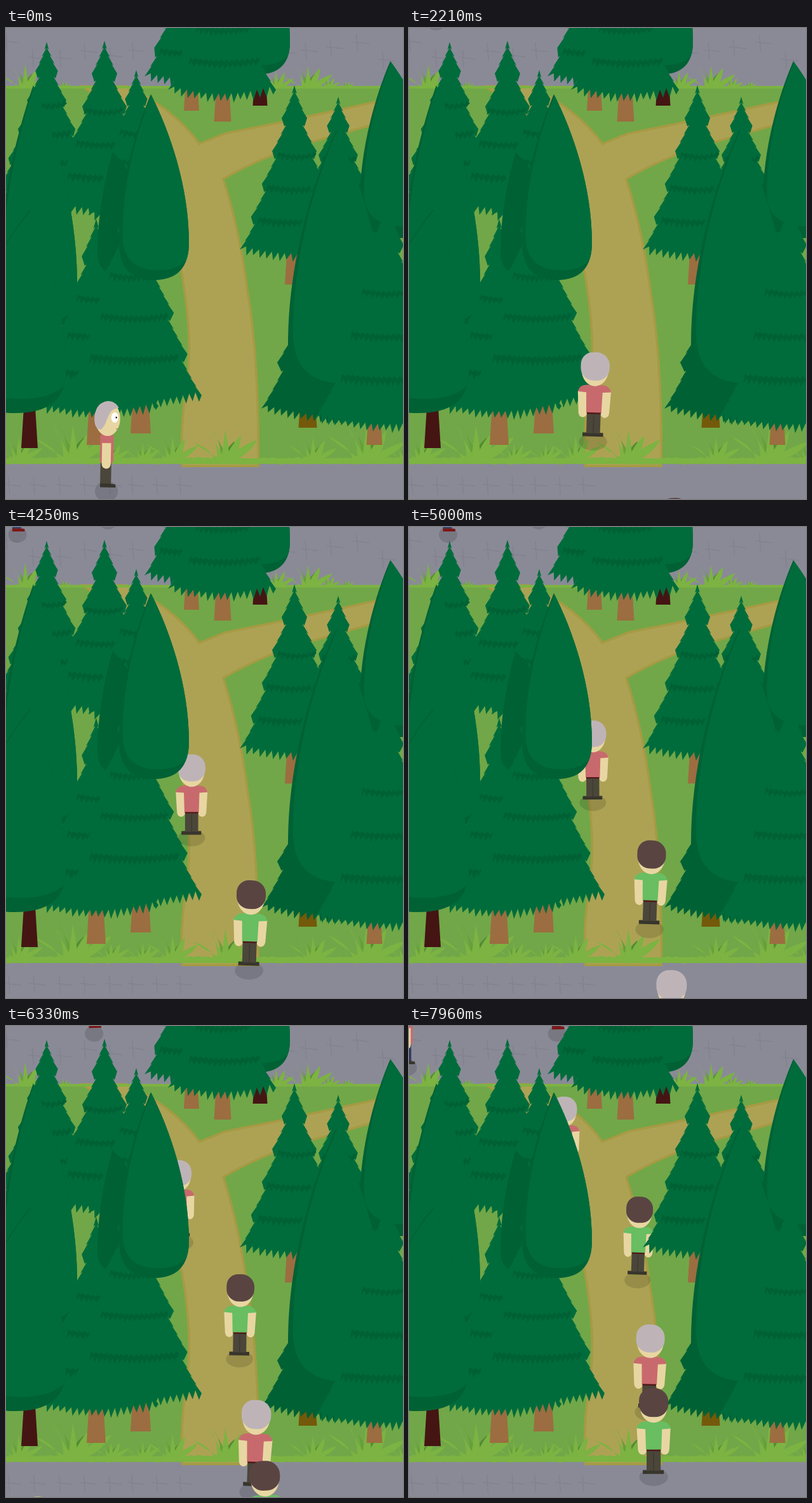
An HTML page with a canvas that plays this animation: 625 px wide and 740 px high, repeating every 8000 ms.

```html
<!DOCTYPE html>
<html lang="en">
<head>
<meta charset="utf-8">
<title>Forest walk</title>
<style>
html, body { margin: 0; height: 100%; overflow: hidden; background: #8a8a97; }
canvas { display: block; }
</style>
</head>
<body>
<canvas id="stage" width="625" height="740"></canvas>
<script>
const W = 625, H = 740, LOOP = 8000, STEP = 760, TREE_LINE = 645;
const GREEN = '#006c3b', SHADE = '#006135', GRASS = '#71a748', LIGHT = '#7cb342', BLADE = '#65a038';
const STONE = '#8a8a97', BARK = '#9c6d40', DARK_BARK = '#451513', SKIN = '#e8d6a2';
const screen = document.getElementById('stage').getContext('2d');
let c;

function layer(paint) {
  const canvas = document.createElement('canvas');
  canvas.width = W;
  canvas.height = H;
  c = canvas.getContext('2d');
  paint();
  return canvas;
}
const noise = n => { const v = Math.sin(n * 127.1) * 43758.5; return v - Math.floor(v); };
const mix = (a, b, u) => a + (b - a) * u;
function fill(color, shape) {
  c.fillStyle = color;
  c.fill(shape);
}
function poly(color, points) {
  const path = new Path2D();
  points.forEach(([x, y]) => path.lineTo(x, y));
  fill(color, path);
}
const svg = (color, d) => fill(color, new Path2D(d));
function ellipse(color, x, y, rx, ry) {
  c.fillStyle = color;
  c.beginPath();
  c.ellipse(x, y, rx, ry, 0, 0, 7);
  c.fill();
}
function round(color, x, y, w, h, r) {
  c.fillStyle = color;
  c.beginPath();
  c.roundRect(x, y, w, h, r);
  c.fill();
}
function box(color, x, y, w, h) {
  c.fillStyle = color;
  c.fillRect(x, y, w, h);
}

// ---- plants ----
function trunk(color, x, bottom, w) {
  const top = bottom - w * 2.4;
  poly(color, [[x - w * .35, top], [x + w * .35, top], [x + w / 2, bottom], [x - w / 2, bottom]]);
}

function band(x, y, half) {
  const top = [], low = [], n = Math.max(4, Math.round(half / 4)), thick = 4 + half * .045;
  for (let i = 0; i <= n; i++) {
    const px = x - half + 2 * half * i / n, py = y + 4 * Math.sin(Math.PI * i / n);
    top.push([px, py - thick], [px + 5, py - thick + 4]);
    low.push([px - 3, py + thick + 3 * noise(i + x)], [px + 3, py + 1]);
  }
  poly(SHADE, [...top, ...low.reverse()]);
}

// Five tiers; every spruce is three times as tall as its half width.
function spruce(x, bottom, half, color = GREEN) {
  const tiers = 5, tall = 3 * half, top = bottom - tall;
  const reach = k => half * (.09 + .91 * (k / tiers) ** 1.15);
  const tipY = k => top + tall * k / tiers;
  const side = dir => {
    const pts = [[x, top]];
    for (let k = 1; k <= tiers; k++) {
      const inner = k > 1 ? reach(k - 1) - half * .1 : 0, teeth = Math.ceil(tall / tiers / 15);
      for (let i = 1; i <= teeth; i++) {
        const u = i / teeth, px = mix(inner, reach(k), u ** 1.2), py = mix(tipY(k - 1), tipY(k), u);
        pts.push([x + dir * px, py]);
        if (i < teeth) pts.push([x + dir * (px - 3), py - 2]);
      }
    }
    return pts;
  };
  const hem = [], n = Math.round(half / 5);
  for (let i = 1; i < n; i++) {
    const u = i / n, px = x + half - 2 * half * u, py = bottom + half * .15 * Math.sin(Math.PI * u);
    hem.push([px + 6 - 6 * u, py + 3 + 5 * noise(i + x)], [px, py - 7]);
  }
  poly(color, [...side(1), ...hem, ...side(-1).reverse()]);
  for (let k = 2; k < tiers; k++) band(x + 6 * noise(k + x) - 3, tipY(k) + 6, reach(k) * .78);
}

function conePath(x, top, mid, half, bottom) {
  const at = k => mix(top, bottom, k), left = mid - half, right = mid + half;
  return new Path2D(`M${x} ${top}C${(x + right) / 2} ${at(.2)} ${right} ${at(.5)} ${right} ${at(.8)}` +
    `Q${right} ${bottom} ${mid} ${bottom}Q${left} ${bottom} ${left} ${at(.8)}` +
    `C${left} ${at(.5)} ${(x + left) / 2} ${at(.2)} ${x} ${top}`);
}
// A round crown, shaded along its left side and its foot.
function cone(x, top, mid, half, bottom, color = GREEN) {
  const outer = conePath(x, top, mid, half, bottom);
  fill(SHADE, outer);
  c.save();
  c.clip(outer);
  fill(color, conePath(x + 2, top, mid + half * .12, half * 1.02, bottom - half * .28));
  c.restore();
}

function blade(color, x, y, dx, dy, w) {
  svg(color, `M${x - w} ${y}Q${x + dx * .2 - w * .3} ${y - dy * .6} ${x + dx} ${y - dy}` +
    `Q${x + dx * .6 + w} ${y - dy * .4} ${x + w} ${y}Z`);
}
function tuft(x, y, size) {
  blade(BLADE, x, y, -size * .4, size * .95, size * .15);
  blade('#528b32', x, y, size * .3, size * .6, size * .13);
  for (let i = -2; i <= 2; i++) {
    const a = i / 2;
    blade(LIGHT, x + a * size * .25, y, a * size * .8, size * (.85 - .4 * a * a + .2 * noise(i + x)), size * .13);
  }
}
function tufts(y, period, list) {
  list.forEach(([x, size]) => [x, x + period].forEach(px => tuft(px, y, size)));
}

// ---- scenery ----
function paintGround() {
  box(STONE, 0, 0, W, H);
  c.strokeStyle = '#82828f';
  c.lineWidth = 1.5;
  for (let i = 0; i < 24; i++) {
    const x = i % 16 * 39 + 8 * noise(i), y = i < 16 ? 8 + 32 * noise(i + 40) : 705;
    c.beginPath();
    c.moveTo(x, y);
    c.lineTo(x + 2, y + 28);
    c.moveTo(x - 6, y + 12);
    c.lineTo(x + 20, y + 15);
    c.stroke();
  }
  box(GRASS, 0, 92, W, 592);

  const path = new Path2D('M115 90Q185 135 200 180L275 385Q295 500 281 570Q272 640 276 690H399' +
    'Q400 520 382 415Q370 320 344 238Q400 205 470 184L640 136V102L420 149L345 164L305 180Q265 125 190 90Z');
  c.save();
  c.clip(path);
  fill('#ada254', path);
  c.strokeStyle = '#a69a43';
  c.lineWidth = 7;
  c.stroke(path);
  c.restore();

  tufts(94, 445, [[30, 37], [62, 18], [425, 27], [90, 12]]);
  box(LIGHT, 0, 91, W, 4);
  tufts(678, 463, [[20, 36], [105, 58], [165, 28], [215, 26], [262, 38], [345, 48]]);
  box(LIGHT, 0, 676, W, 9);
  for (let x = 4; x < W; x += 13) ellipse(LIGHT, x, 679 + 2 * noise(x), 8, 5);

  trunk(BARK, 292, 130, 24);
  trunk(BARK, 341, 147, 27);
  trunk(DARK_BARK, 400, 122, 23);
  trunk(BARK, 450, 403, 22);
  trunk(DARK_BARK, 37, 660, 26);
  trunk(BARK, 142, 655, 30);
  trunk(BARK, 212, 637, 32);
  trunk('#75590a', 475, 628, 29);
  trunk(BARK, 580, 655, 25);
}

function paintTrees() {
  cone(395, -180, 395, 52, 73);
  spruce(293, 76, 75);
  spruce(340, 97, 85);

  spruce(64, 250, 76);
  spruce(155, 278, 86);
  spruce(205, 294, 76);
  cone(43, 90, 50, 62, 480);
  spruce(142, 594, 98);
  cone(168, 195, 192, 48, 392, SHADE);
  spruce(200, 577, 108);
  cone(228, 104, 233, 55, 396);
  cone(38, 285, 14, 80, 605);

  spruce(454, 348, 86);
  spruce(523, 598, 121, SHADE);
  spruce(523, 336, 76);
  cone(605, 52, 622, 65, 330);
  cone(520, 160, 522, 78, 580);
  spruce(600, 612, 113);
}

// ---- people ----
const outfit = (hair, shirt, pants, shoe = '#38352c') => ({ hair, shirt, pants, shoe });
const GREY = outfit('#beb4b8', '#c86a6d', '#4b463a');
const BROWN = outfit('#5a4442', '#68be61', '#4b463a');
const BLUE = outfit('#5a4442', '#4d68a8', '#34466f', '#7d1715');
const NAVY = outfit('#5a4442', '#c86a6d', '#2f3a5c');
const BLOND = outfit('#fff23c', '#4d68a8', '#34466f');

// Straight walk: at time `at` the walker stands at (x, y).
const straight = (at, x, y, vx, vy = 0) => t => ({ x: x + vx * (t - at), y: y + vy * (t - at) });
// Walk up a trail of [x, y] points, slowing with distance.
const climb = (enter, pace, trail) => t => {
  const y = (trail[0][1] + 1000) * Math.exp(-pace * (t - enter) / 1e5) - 1000;
  const i = Math.max(1, trail.findIndex(p => p[1] < y));
  const [[x1, y1], [x2, y2]] = [trail[i - 1], trail[i]];
  return { x: mix(x1, x2, (y - y1) / (y2 - y1)), y };
};
const LEFT_TRAIL = [[285, 694], [297, 582], [287, 386], [265, 302], [235, 190]];
const RIGHT_TRAIL = [[424, 900], [402, 785], [381, 690], [376, 575], [361, 482], [358, 300]];
const STROLL = .058;

// level: a time when the body stands upright
const people = [
  { look: GREY, side: true, level: 4250, from: 0, to: 1690, walk: straight(0, 158, 728, .076, -.02) },
  { look: GREY, level: 4250, from: 1690, to: LOOP, walk: climb(1690, 5.05, LEFT_TRAIL) },
  { look: BROWN, level: 5520, from: 2080, to: LOOP, walk: climb(2080, 5.2, RIGHT_TRAIL) },
  { look: GREY, level: 6920, from: 4316, to: LOOP, walk: climb(4316, 4.6, RIGHT_TRAIL) },
  { look: BROWN, level: 7960, from: 5434, to: LOOP, walk: climb(5434, 4.2, RIGHT_TRAIL) },
  { look: BLOND, level: 6920, from: 6300, to: LOOP, walk: straight(6920, -11, 874, -.1, -.027) },
  { look: BLUE, side: true, level: 4250, from: 800, to: LOOP, walk: straight(1480, 0, -9, STROLL) },
  { look: BLUE, side: true, level: 4250, from: 3300, to: LOOP, walk: straight(3940, 0, 12, STROLL) },
  { look: NAVY, side: true, level: 7960, from: 7000, to: LOOP, walk: straight(LOOP, 0, 65, STROLL) }
];

function drawBack(look) {
  box(look.shoe, -17, -6, 33, 6);
  box(look.pants, -11, -37, 22, 32);
  box('#3d392f', -.7, -34, 1.4, 29);
  for (const dir of [-1, 1]) {
    c.save();
    c.scale(dir, 1);
    svg(SKIN, 'M12 -73L26.500 -72L24.500 -37Q23 -30 17 -30Q11 -31 11 -38Z');
    c.restore();
  }
  svg(look.shirt, 'M-26.500 -71Q-24 -82 -12 -82H12Q24 -82 26.500 -71L13 -70L12 -37H-12L-13 -70Z');
  box('#50191a', -11, -38, 22, 2.5);
  ellipse(SKIN, 0, -106, 21.5, 26);
  round(look.hair, -23, -134, 46, 45, [19, 21, 20, 20]);
}

function drawSide(look) {
  box(look.pants, -10, -38, 17, 33);
  svg(look.shoe, 'M-10 0V-6H4L14 -5V0Z');
  round(look.shirt, -11, -84, 21, 47, 5);
  round(SKIN, -8, -69, 14, 40, [0, 0, 7, 7]);
  ellipse(SKIN, 0, -107, 19.5, 27);
  svg(look.hair, 'M-10 -90C-25 -88 -24 -127 -8 -132C2 -138 14 -132 17 -124Q8 -123 4 -117C-2 -107 -3 -95 -10 -90Z');
  ellipse('#fff', 11, -109, 5.5, 8);
  ellipse('#222', 13.5, -109, 1.3, 1.5);
  box('#9a8258', 13, -92, 4, 1);
}

function drawPerson({ look, side, x, y, angle }) {
  const foot = y - 7 + 2 * Math.cos(2 * angle), scale = (107.7 + .0382 * foot) / 134;
  c.save();
  c.translate(x, y);
  c.scale(scale, scale);
  ellipse('rgba(0,0,0,.13)', 0, 0, side ? 18 : 22.5, side ? 16 : 14);
  c.translate(0, (foot - y) / scale);
  c.rotate(Math.sin(angle) * .035);
  (side ? drawSide : drawBack)(look);
  c.restore();
}

const ground = layer(paintGround);
const trees = layer(paintTrees);

function frame(now) {
  const t = now % LOOP;
  const walkers = people.filter(p => t >= p.from && t < p.to)
    .map(p => ({ ...p, ...p.walk(t), angle: (t - p.level) / STEP * 2 * Math.PI }))
    .sort((a, b) => a.y - b.y);
  c = screen;
  c.drawImage(ground, 0, 0);
  walkers.filter(p => p.y < TREE_LINE).forEach(drawPerson);
  c.drawImage(trees, 0, 0);
  walkers.filter(p => p.y >= TREE_LINE).forEach(drawPerson);
  requestAnimationFrame(frame);
}
requestAnimationFrame(frame);
</script>
</body>
</html>
```
